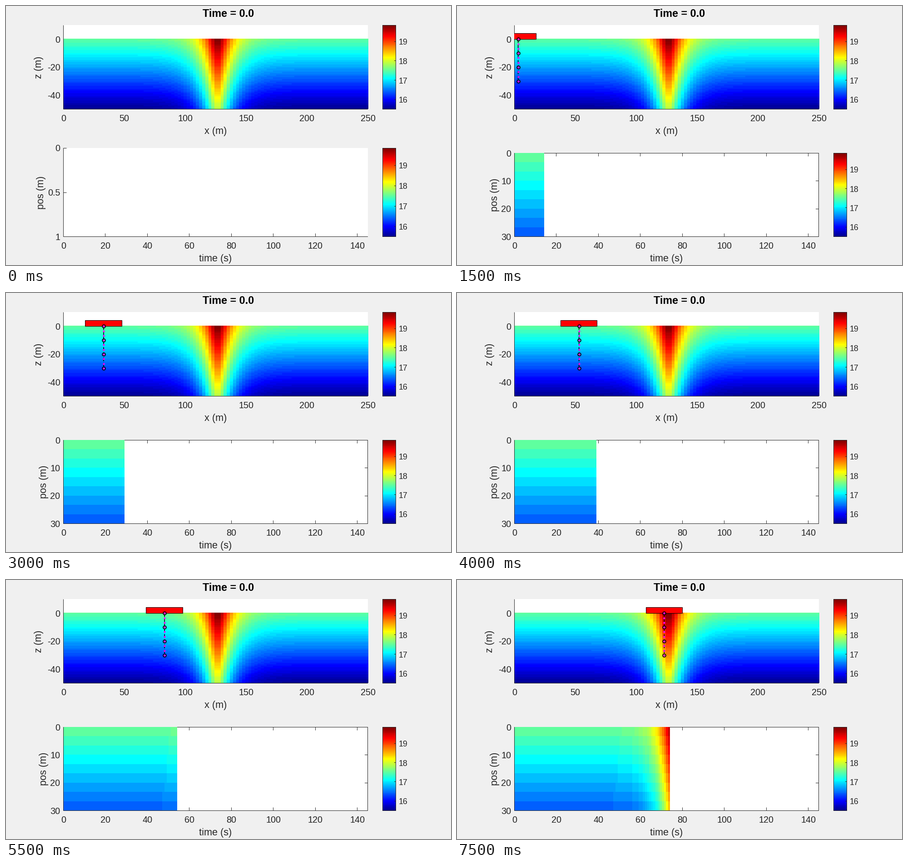
Write a matplotlib script that moves like this. It is 980 by 571 pixels and loops after 8000 ms.

```python
import numpy as np
import matplotlib.pyplot as plt
from matplotlib.animation import FuncAnimation
from matplotlib.colors import ListedColormap
from matplotlib.patches import Rectangle

W, H, DPI = 980, 571, 64
PX = 72 / DPI                     # points per pixel
INK = "#262626"
LEFT, RIGHT = 126.5, 797
TOP, BOTTOM = 42.5, 227.5         # upper plot
LOW = 508.5                       # bottom of the lower plot
T_MIN, T_MAX = 15.5, 19.84
T_END = 145

plt.rcParams["font.family"] = "Liberation Sans"
plt.rcParams["path.snap"] = False


def jet64():
    i = np.arange(1, 65)

    def ramp(mid):
        return np.clip((24 - abs(i - mid)) / 16, 0, 1)

    return ListedColormap(np.column_stack([ramp(48), ramp(32), ramp(16)]))


def temperature(x, z):
    d = np.hypot(x - 125, 4) - 4
    return 17.5 + 0.04 * z + 2.38 * np.exp(-d / 10.8)


def px_x(x):
    return LEFT + x * (RIGHT - LEFT) / 250


def px_z(z):
    return TOP + (10 - z) * (BOTTOM - TOP) / 60


def px_t(t):
    return LEFT + t * (RIGHT - LEFT) / T_END


def crisp(v):
    """Centre of the pixel that holds v."""
    return np.floor(v) + .5


fig = plt.figure(figsize=(W / DPI, H / DPI), dpi=DPI, facecolor="#f0f0f0")
ax = fig.add_axes([0, 0, 1, 1])
ax.axis("off")
CMAP = jet64()


def vline(x, y0, y1, z=2, color=INK):
    return ax.plot([crisp(x)] * 2, [y0, y1], color=color, lw=PX, zorder=z,
                   solid_capstyle="butt")[0]


def hline(y, x0, x1, z=2):
    return ax.plot([x0, x1], [crisp(y)] * 2, color=INK, lw=PX, zorder=z,
                   solid_capstyle="butt")[0]


def text(x, y, s, size=19.8, ha="center", **kw):
    kw.setdefault("color", INK)
    return ax.text(x, y, s, fontsize=size * PX, ha=ha, va="baseline",
                   rotation_mode="anchor", zorder=6, **kw)


def white(top, bottom):
    x, y = np.floor(LEFT), np.floor(top)
    return ax.add_patch(Rectangle((x, y), RIGHT - x, np.floor(bottom) - y,
                                  fc="white", ec="none", zorder=1))


def image(data, left, right, top, bottom):
    return ax.imshow(data, cmap=CMAP, vmin=T_MIN, vmax=T_MAX, aspect="auto",
                     extent=(left, right, bottom, top), zorder=3,
                     interpolation="nearest")


def colorbar(top, bottom):
    left, right = 829, 859
    steps = np.linspace(T_MAX, T_MIN, 129)[1::2, None]
    parts = [image(steps, left, right, np.floor(top), np.floor(bottom) + 1)]
    y0, y1 = crisp(top), crisp(bottom)
    parts.append(ax.add_patch(Rectangle((left + .5, y0), right - left - 1,
                                        y1 - y0, fc="none", ec=INK,
                                        lw=PX, zorder=4)))
    for v in range(16, 20):
        y = bottom - (v - T_MIN) / (T_MAX - T_MIN) * (bottom - top)
        parts.append(hline(y, right - 4, right, 5))
        parts.append(text(865, y + 7, str(v), 17.8, "left"))
    return parts


def lower_frame(top, ticks, label_x, boxed):
    """Axes of the time plot; ticks maps a label to its share of the height."""
    parts = [white(top, LOW),
             vline(LEFT, top, LOW),
             hline(LOW, LEFT, RIGHT, 4)]
    if boxed:
        parts += [hline(top, LEFT, RIGHT), vline(RIGHT - 1, top, LOW)]
    for s, share in ticks.items():
        y = top + share * (LOW - top)
        parts.append(text(119.5, y + 7, s, ha="right"))
        parts.append(hline(y, LEFT, LEFT + 7))
        if boxed:
            parts.append(hline(y, RIGHT - 7, RIGHT))
    for t in range(20, T_END, 20):
        x = px_t(t)
        parts.append(vline(x, LOW - 7, LOW))
        if boxed:
            parts.append(vline(x, top, top + 7))
    parts.append(text(label_x, (top + LOW) / 2, "pos (m)", 21.8, rotation=90))
    return parts + colorbar(top, LOW)


# Upper plot
text(490, 23.5, "Time = 0.0", 23.3, weight="bold", color="black")
white(TOP, BOTTOM)
vline(LEFT, TOP, BOTTOM)
hline(BOTTOM, LEFT, RIGHT, 4)
vline(RIGHT - 1, 220, BOTTOM, 4, "#000060")
grid_x = np.linspace(0, 250, 100)[:-1]
grid_z = np.linspace(0, -50, 50)[:-1, None]
image(temperature(grid_x, grid_z), LEFT, RIGHT, px_z(0), BOTTOM)
for v in range(0, 251, 50):
    text(px_x(v), 254, str(v))
for v in (0, -20, -40):
    text(119.5, px_z(v) + 7.5, str(v), ha="right")
text(461.5, 282, "x (m)", 21.8)
text(78, 135, "z (m)", 21.8, rotation=90)
colorbar(TOP, BOTTOM)

# Lower plot
for v in range(0, T_END, 20):
    text(px_t(v), 535, str(v))
text(461.5, 562.5, "time (s)", 21.8)
empty = lower_frame(313.5, {"0": 0, "0.5": .5, "1": 1}, 83, False)
boxed = lower_frame(324.5, {"0": 0, "10": 1 / 3, "20": 2 / 3, "30": 1},
                    89, True)
times = np.arange(T_END)
depths = -np.linspace(0, 30, 10)
record = temperature(2 * times - 25, depths[:-1, None])
history = image(record, LEFT, RIGHT, 324, 508)

# Ship and sensor string
clip = Rectangle((np.floor(LEFT), TOP), RIGHT - np.floor(LEFT), BOTTOM - TOP,
                 transform=ax.transData)
deck, keel = crisp(px_z(4) - .1), crisp(px_z(0))
ship = Rectangle((0, deck), 1, keel - deck, fc="red", ec="black", lw=PX,
                 zorder=4)
ax.add_patch(ship)
ship.set_clip_path(clip)
rod, = ax.plot([], [], color="black", lw=1.6 * PX, zorder=5,
               dashes=(5, 2.2), dash_capstyle="butt")
rings, = ax.plot([], [], "o", ms=7 * PX, mfc="none", mec="black",
                 mew=1.6 * PX, zorder=5)
dots, = ax.plot([], [], "o", ms=4.2 * PX, color="magenta", mew=0, zorder=5)
string = ((rod, depths[[0, -1]]), (rings, depths[::3]), (dots, depths))

ax.set_xlim(0, W)
ax.set_ylim(H, 0)


def update(i):
    now = 5 * i - 1
    x = 2 * now - 25
    for part in empty:
        part.set_visible(i == 0)
    for part in boxed:
        part.set_visible(i > 0)
    hidden = np.broadcast_to(times >= now, record.shape)
    history.set_data(np.ma.array(record, mask=hidden))
    history.set_visible(i > 0)
    stern, bow = crisp(px_x(x - 15)), crisp(px_x(x + 15))
    ship.set_x(stern)
    ship.set_width(bow - stern)
    ship.set_visible(x + 15 > 0)
    for part, z in string:
        part.set_data(np.full(len(z), px_x(x)), px_z(z))
        part.set_visible(x >= 0)
    return []


anim = FuncAnimation(fig, update, frames=16, interval=500, repeat=True,
                     repeat_delay=0, blit=False)
plt.show()
```
